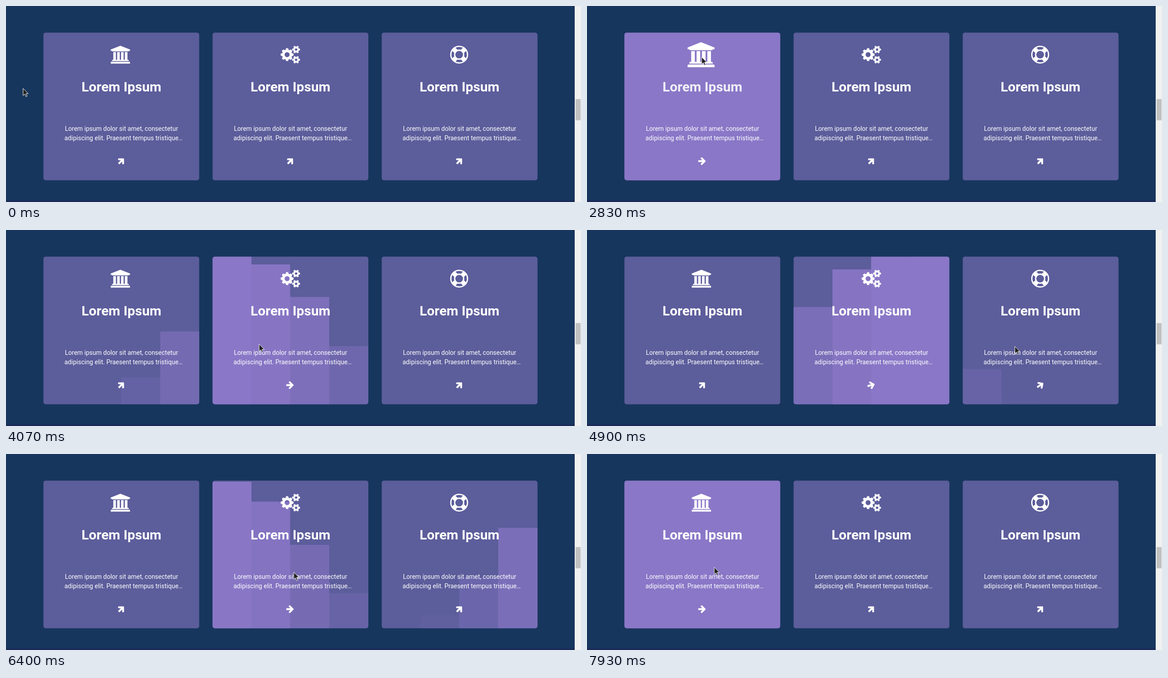
Recreate the animation shown at these times as an HTML page. Size 1279 by 438 pixels, loop 8.56 s.

```html
<!DOCTYPE html>
<html lang="en">
<head>
<meta charset="utf-8">
<title>Hover cards</title>
<style>
html, body { margin: 0; width: 100%; height: 100%; overflow: hidden; background: #17365d; }
svg { display: block; width: 100vw; height: 100vh; }
.label { font-family: Roboto, sans-serif; color: #fff; white-space: nowrap; line-height: normal; }
</style>
</head>
<body>
<svg id="stage" viewBox="0 0 1279 438"></svg>
<script>
const LOOP = 8560, W = 346.5, TOP = 59.5, H = 330, STEP = 376, LEFT = 83, MID = 173.2;
const EM = 1 / 1792;

// Alternating enter / leave times of each card.
const HOVER = [
  [565, 3519, 7112],
  [3552, 4698, 5932, 7096],
  [4732, 5905]
];
const TITLE_HOVER = [1830, 2605];
const ICON_HOVER = [2625, 3450];

// Pointer moves: start, end, x, y, easing.
const out = u => 1 - (1 - u) ** 3;
const MOVES = [
  [0, 1, 38, 184, out],
  [553, 800, 283, 243, out],
  [1755, 2010, 262, 180, out],
  [2560, 2760, 255, 114, out],
  [3420, 3840, 563, 255, out],
  [4620, 4930, 952, 260, out],
  [5880, 6100, 640, 264, out],
  [6760, 7080, 480, 260, u => u],
  [7080, 7310, 283, 253, out]
];

const clamp = u => Math.min(1, Math.max(0, u));

// cubic-bezier(.42, 0, .58, 1)
function ease(u) {
  if (u <= 0) return 0;
  if (u >= 1) return 1;
  let lo = 0, hi = 1, s = .5;
  for (let i = 0; i < 24; i++) {
    s = (lo + hi) / 2;
    const x = 1.26 * (1 - s) ** 2 * s + 1.74 * (1 - s) * s * s + s ** 3;
    if (x < u) lo = s; else hi = s;
  }
  return s * s * (3 - 2 * s);
}

const toggle = (times, t, dur) =>
  times.reduce((v, at, i) => v + (i % 2 ? -1 : 1) * ease((t - at) / dur), 0);

function pointerAt(t) {
  let [, , x, y] = MOVES[0];
  for (const [a, b, nx, ny, fn] of MOVES) {
    if (t < a) break;
    const u = fn(clamp((t - a) / (b - a)));
    x += (nx - x) * u;
    y += (ny - y) * u;
  }
  return [x, y];
}

function add(parent, name, attrs = {}) {
  const node = document.createElementNS("http://www.w3.org/2000/svg", name);
  for (const k in attrs) node.setAttribute(k, attrs[k]);
  parent.append(node);
  return node;
}

const rect = (p, x, y, width, height, fill, rx = 0) =>
  add(p, "rect", { x, y, width, height, fill, rx });

// HTML text keeps the browser's normal glyph spacing.
function label(p, x, baseline, size, weight, text) {
  const box = add(p, "foreignObject", { x, y: baseline - Math.round(size * .928), width: 300, height: size * 1.5 });
  const div = document.createElement("div");
  div.className = "label";
  div.style.fontSize = size + "px";
  div.style.fontWeight = weight;
  div.textContent = text;
  box.append(div);
  return box;
}

function gear(cx, cy, teeth, rOut, wOut, rIn, wIn, hole) {
  const pts = [];
  for (let i = 0; i < teeth; i++) {
    const a = i * 2 * Math.PI / teeth, c = Math.cos(a), s = Math.sin(a);
    for (const [r, w] of [[rIn, -wIn], [rOut, -wOut], [rOut, wOut], [rIn, wIn]])
      pts.push(`${(cx + r * c - w * s).toFixed(1)} ${(cy + r * s + w * c).toFixed(1)}`);
  }
  return `M${pts.join("L")}ZM${cx - hole} ${cy}` +
    `a${hole} ${hole} 0 1 0 ${2 * hole} 0a${hole} ${hole} 0 1 0 ${-2 * hole} 0Z`;
}

// Icons use a 1792-unit em with y pointing up.
function bank(g) {
  const d = "M960 1536l960-384v-128h-128q0-26-20.5-45t-48.5-19h-1526q-28 0-48.5 19t-20.5 45h-128v128z" +
    "M256 896h256v-768h128v768h256v-768h128v768h256v-768h128v768h256v-768h59q28 0 48.5-19t20.5-45v-64" +
    "h-1664v64q0 26 20.5 45t48.5 19h59z" +
    "M1851-64q28 0 48.5-19t20.5-45v-128h-1920v128q0 26 20.5 45t48.5 19z";
  add(g, "path", { d, fill: "#fff" });
}

function cogs(g) {
  const d = gear(640, 640, 8, 632, 96, 475, 142, 256) +
    [128, 1152].map(y => gear(1536, y, 6, 380, 74, 258, 106, 128)).join("");
  add(g, "path", { d, fill: "#fff", "fill-rule": "evenodd", stroke: "#fff", "stroke-width": 16, "stroke-linejoin": "round" });
}

function ring(g) {
  const r = add(g, "g", { transform: "translate(896 640) rotate(45)", fill: "none", stroke: "#fff", "stroke-width": 128 });
  add(r, "circle", { r: 832 });
  add(r, "circle", { r: 448 });
  add(r, "path", { d: "M-832 0H-448M448 0H832M0-832V-448M0 448V832", "stroke-width": 448 });
}

const ARROW = "M1472 576q0-54-37-91l-651-651q-39-37-91-37q-51 0-90 37l-75 75q-38 38-38 91t38 91l293 293h-704" +
  "q-52 0-84.5 37.5t-32.5 90.5v128q0 53 32.5 90.5t84.5 37.5h704l-293 294q-38 36-38 90t38 90l75 75" +
  "q38 38 90 38q53 0 91-38l651-651q37-35 37-90z";

const ICONS = [[bank, 2048], [cogs, 1920], [ring, 1792]];

function makeCard(svg, i) {
  const g = add(svg, "g", { transform: `translate(${LEFT + i * STEP} 0)` });
  const clip = add(g, "clipPath", { id: "clip" + i });
  rect(clip, .25 * (i + 1), TOP, W, H, "#000", 5);
  const panel = add(g, "g", { "clip-path": `url(#clip${i})` });
  rect(panel, 0, 59, 348, 331, "#5c5d9b");
  const edge = k => k < 4 ? Math.round(k * W / 4) : 348;
  const strips = [0, 1, 2, 3].map(k =>
    rect(panel, edge(k), TOP + H, edge(k + 1) - edge(k), 0, "#8a77c7"));

  const icon = add(g, "g");
  const [draw, advance] = ICONS[i];
  const k = 40 * EM;
  draw(add(icon, "g", { transform: `translate(${Math.round(MID - advance * k / 2)} 123) scale(${k} ${-k})` }));

  const title = label(g, 85, 191, 30, 700, "Lorem Ipsum");
  label(g, 48, 279, 14, 400, "Lorem ipsum dolor sit amet, consectetur");
  label(g, 47, 300, 14, 400, "adipiscing elit. Praesent tempus tristique…");

  const arrow = add(g, "g");
  add(arrow, "path", { d: ARROW, fill: "#fff", transform: `scale(${20 * EM} ${-20 * EM}) translate(-768 -640)` });
  return { strips, icon, title, arrow };
}

const svg = document.getElementById("stage");
rect(svg, 0, 0, 1279, 438, "#17365d");
rect(svg, 0, 434, 1265, 4, "#1b2c59");
const cards = HOVER.map((_, i) => makeCard(svg, i));
rect(svg, 1265, 0, 14, 438, "#f1f1f1");
rect(svg, 1267, 208, 11, 47.5, "#c1c1c1");
const pointer = add(svg, "path", {
  d: "M0 0V16.2L3.8 12.8L6.4 18.6L9 17.5L6.5 11.8H11.5Z",
  fill: "#222", stroke: "#fff", "stroke-width": 1, "stroke-linejoin": "round"
});

function render(t) {
  cards.forEach((c, i) => {
    c.strips.forEach((s, k) => {
      const p = toggle(HOVER[i], t - k * 100, 500);
      s.setAttribute("y", TOP + H * (1 - p));
      s.setAttribute("height", H * p + .5);
      s.setAttribute("opacity", p);
    });
    const turn = 45 * (toggle(HOVER[i], t, 500) - 1);
    c.arrow.setAttribute("transform", `translate(${MID - .2} 346) rotate(${turn})`);
  });
  const first = cards[0];
  const zoom = 1 + .5 * toggle(ICON_HOVER, t, 300);
  first.icon.setAttribute("transform",
    `translate(${MID} 108.6) scale(${zoom}) translate(${-MID} -108.6)`);
  first.title.setAttribute("opacity", 1 - .2 * toggle(TITLE_HOVER, t, 500));
  const [x, y] = pointerAt(t);
  pointer.setAttribute("transform", `translate(${x} ${y})`);
}

const start = performance.now();
function tick(now) {
  render(Math.max(0, now - start) % LOOP);
  requestAnimationFrame(tick);
}
render(0);
requestAnimationFrame(tick);
</script>
</body>
</html>
```
